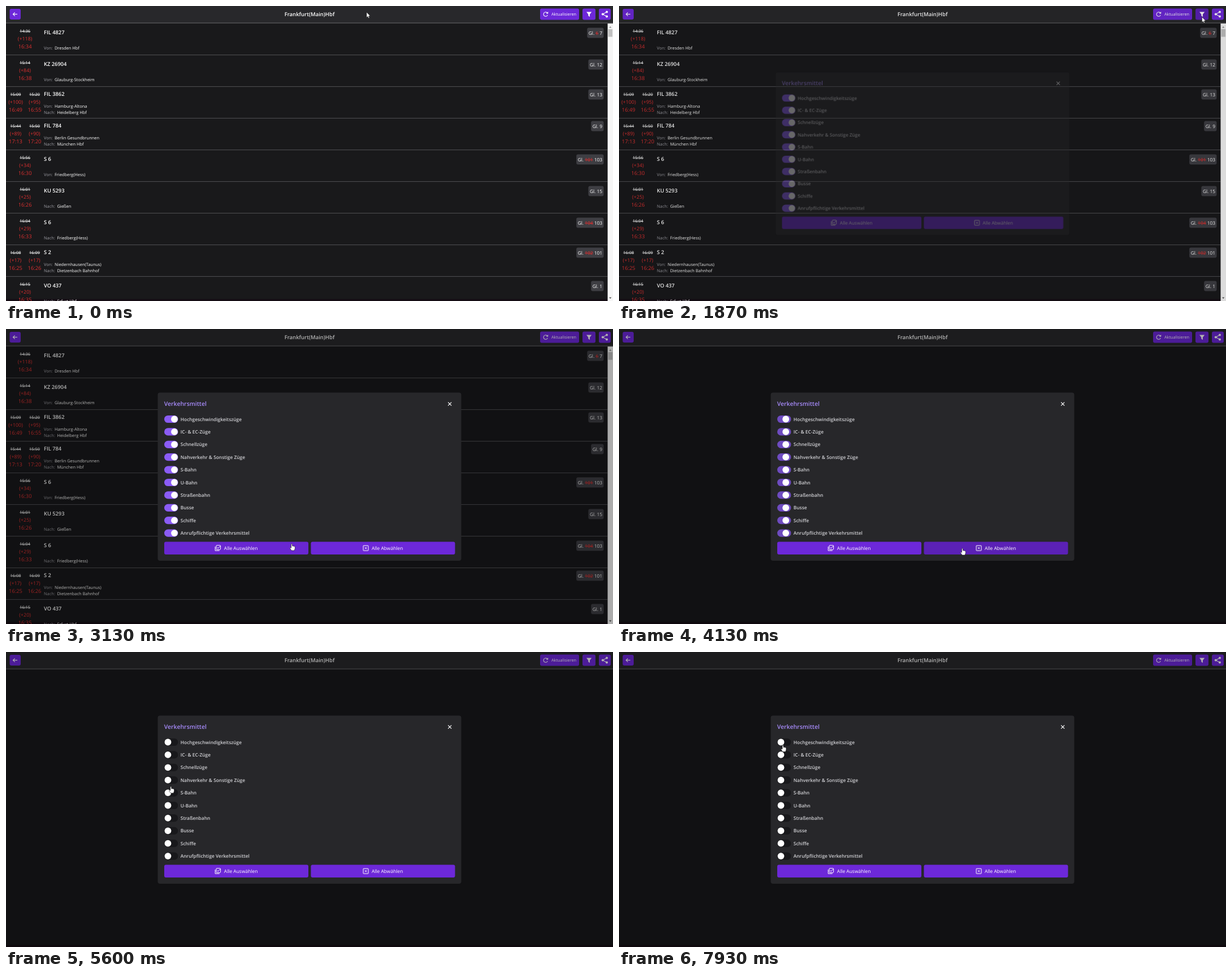
Write an HTML page with a canvas that moves like this. It is 1074 px wide and 522 px high and loops after 8 s.

```html
<!DOCTYPE html>
<html lang="de">
<head>
<meta charset="utf-8">
<title>Abfahrtstafel</title>
<style>
html, body { margin: 0; width: 100%; height: 100%; overflow: hidden; background: #19191b; }
canvas { display: block; width: 1074px; height: 522px; }
</style>
</head>
<body>
<canvas id="stage" width="1074" height="522"></canvas>
<script>
const W = 1074, H = 522, LOOP = 8000;
const stage = document.getElementById('stage').getContext('2d');
const layerCanvas = document.createElement('canvas');
layerCanvas.width = W;
layerCanvas.height = H;
const layer = layerCanvas.getContext('2d');
let c = stage;

const VIOLET = [109, 40, 217], VIOLET_DARK = [91, 33, 182];
const TRACK_ON = [139, 92, 246], TRACK_OFF = [24, 24, 27];
const RED = '#dc3030', GREEN = '#16a34a', WHITE = '#fff';

// times: planned|delay|actual, separated by commas for arrival and departure
const trains = [
  { name: 'FIL 4827', from: 'Dresden Hbf', old: '6', track: '7', times: '14:36|+118|16:34' },
  { name: 'KZ 26904', from: 'Glauburg-Stockheim', track: '12', times: '15:14|+84|16:38' },
  { name: 'FIL 3862', from: 'Hamburg-Altona', to: 'Heidelberg Hbf', track: '13', times: '15:09|+100|16:49,15:20|+95|16:55' },
  { name: 'FIL 784', from: 'Berlin Gesundbrunnen', to: 'München Hbf', track: '9', times: '15:44|+89|17:13,15:50|+90|17:20' },
  { name: 'S 6', from: 'Friedberg(Hess)', old: '101', track: '103', times: '15:56|+34|16:30' },
  { name: 'KU 5293', to: 'Gießen', track: '15', times: '16:01|+25|16:26' },
  { name: 'S 6', to: 'Friedberg(Hess)', old: '104', track: '103', times: '16:04|+29|16:33' },
  { name: 'S 2', from: 'Niedernhausen(Taunus)', to: 'Dietzenbach Bahnhof', old: '102', track: '101', times: '16:08|+17|16:25,16:09|+17|16:26' },
  { name: 'VO 437', to: 'Erfurt Hbf', track: '1', times: '16:15|+20|16:35' }
];
const filtered = [
  trains[8],
  { name: 'LO 6758', from: 'Norddeich Mole', track: '15', times: '16:35|+74|17:49' },
  { name: 'LO 5093', from: 'Heidelberg Hbf', to: 'Hamburg-Altona', track: '12', times: '16:40||16:40,16:48|+30|17:18' }
];
const modes = ['Hochgeschwindigkeitszüge', 'IC- & EC-Züge', 'Schnellzüge', 'Nahverkehr & Sonstige Züge',
  'S-Bahn', 'U-Bahn', 'Straßenbahn', 'Busse', 'Schiffe', 'Anrufpflichtige Verkehrsmittel'];

// pointer path: time, x, y
const path = [
  [133, 638, 11], [400, 730, 14], [1000, 972, 13], [1400, 1028, 15], [1800, 1031, 18], [1867, 1031.5, 19.5],
  [2000, 1015, 30], [2400, 800, 105], [2800, 600, 174], [3133, 505.5, 380], [3533, 607.5, 388],
  [4600, 607.5, 388], [4933, 480.5, 390], [5100, 410, 362], [5400, 298, 291],
  [5800, 285.5, 184.5], [7680, 285.5, 184.5], [7933, 290, 164.5]
];
const selectBtn = [280, 376.5, 255, 22.5], rejectBtn = [539.5, 376.5, 255, 22.5];
const refreshBtn = [945, 4.5, 69, 20], filterBtn = [1020, 4.5, 23, 20];
const toggles = [280, 153, 24, 215];

const clamp = v => Math.max(0, Math.min(1, v));
const smooth = (t, start, len) => { const p = clamp((t - start) / len); return p * p * (3 - 2 * p); };
const mix = (a, b, p) => `rgb(${a.map((v, i) => Math.round(v + (b[i] - v) * p)).join()})`;
const inside = ([x, y], [bx, by, bw, bh]) => x >= bx && x <= bx + bw && y >= by && y <= by + bh;

function pointer(t) {
  const i = path.findIndex(k => k[0] > t);
  if (i === 0) return path[0].slice(1);
  if (i < 0) return path[path.length - 1].slice(1);
  const [t0, x0, y0] = path[i - 1], [t1, x1, y1] = path[i];
  const p = (t - t0) / (t1 - t0);
  return [x0 + (x1 - x0) * p, y0 + (y1 - y0) * p];
}

// share of the last 150 ms spent over a box
function hover(t, box) {
  let n = 0;
  for (let k = 0; k < 5; k++) n += inside(pointer(t - k * 30), box);
  return n / 5;
}

function setFont(size, weight = 400) {
  c.font = `${weight} ${size}px "Open Sans", "Noto Sans", sans-serif`;
  c.textRendering = 'geometricPrecision';
}

// y is the middle of the capital letters; returns the right end
function text(s, x, y, size, color, { weight, align = 'left', strike } = {}) {
  setFont(size, weight);
  const w = c.measureText(s).width;
  if (align === 'center') x -= w / 2;
  c.fillStyle = color;
  c.fillText(s, x, y + size * 0.357);
  if (strike) c.fillRect(x, y - 0.1, w, 0.9);
  return x + w;
}

function box(x, y, w, h, r, color) {
  c.fillStyle = color;
  c.beginPath();
  c.roundRect(x, y, w, h, r);
  c.fill();
}

function dot(x, y, r, color = WHITE) {
  c.fillStyle = color;
  c.beginPath();
  c.arc(x, y, r, 0, 7);
  c.fill();
}

function poly(points, { fill, stroke, width = 1, close = true } = {}) {
  c.beginPath();
  points.forEach(([x, y]) => c.lineTo(x, y));
  if (close) c.closePath();
  if (fill) { c.fillStyle = fill; c.fill(); }
  if (stroke) { c.strokeStyle = stroke; c.lineWidth = width; c.stroke(); }
}
const line = (points, width = 1) => poly(points, { stroke: WHITE, width, close: false });

function header(t) {
  c.fillStyle = '#28282b';
  c.fillRect(0, 0, W, 29);
  c.fillStyle = '#464649';
  c.fillRect(0, 29, W, 2);
  const violet = mix(VIOLET, VIOLET, 0);
  box(6.5, 5, 19.5, 19, 3, violet);
  line([[20, 14.5], [12.5, 14.5]], 1.2);
  line([[15.7, 11.3], [12.5, 14.5], [15.7, 17.7]], 1.2);
  text('Frankfurt(Main)Hbf', 537, 14.5, 9.5, WHITE, { weight: 600, align: 'center' });

  box(...refreshBtn, 3, violet);
  c.strokeStyle = WHITE;
  c.lineWidth = 1.1;
  c.beginPath();
  c.arc(954.8, 14.6, 3.7, 0.35, 5.5);
  c.stroke();
  poly([[959.2, 10], [959.2, 13.6], [955.6, 13.6]], { fill: WHITE });
  text('Aktualisieren', 965, 14.7, 7.3, WHITE);

  const over = t < 1900 ? hover(t, filterBtn) : 0;
  box(...filterBtn, 3, mix(VIOLET, VIOLET_DARK, over));
  poly([[1027, 10.5], [1036.2, 10.5], [1032.9, 14.8], [1032.9, 19.2], [1030.3, 17.3], [1030.3, 14.8]], { fill: WHITE });

  box(1049, 4.5, 21, 20, 3, violet);
  line([[1063, 10.6], [1055.8, 14.6], [1063, 18.6]], 1.1);
  dot(1055.8, 14.6, 2);
  dot(1063, 10.6, 2);
  dot(1063, 18.6, 2);
}

function clock(entry, x, top) {
  const [plan, delay, real] = entry.split('|');
  const opt = { align: 'center' };
  if (!delay) {
    text(plan, x, top + 20.5, 8.4, WHITE, opt);
    text(real, x, top + 35.3, 9.4, GREEN, opt);
    return;
  }
  text(plan, x, top + 13.6, 7.35, WHITE, { align: 'center', strike: true });
  text(`(${delay})`, x, top + 26.5, 8.9, RED, opt);
  text(real, x, top + 41, 9.4, RED, opt);
}

function badge(train, right, y) {
  setFont(8.35);
  const parts = [['Gl. ', WHITE], ...(train.old ? [[train.old, RED, true], [' ', WHITE]] : []), [train.track, WHITE]];
  const w = parts.reduce((sum, p) => sum + c.measureText(p[0]).width, 0);
  box(right - w - 5, y - 9, w + 5, 18, 3, '#3e3e43');
  let x = right - w - 2.5;
  for (const [s, color, strike] of parts) x = text(s, x, y + 0.3, 8.35, color, { strike });
}

function row(train, i, right) {
  const top = 31 + 56 * i, times = train.times.split(',');
  const stops = [['Von:', train.from], ['Nach:', train.to]].filter(s => s[1]);
  const both = stops.length === 2;
  if (times.length > 1) times.forEach((e, k) => clock(e, 17 + 33.5 * k, top));
  else clock(times[0], 33.6, top);
  text(train.name, 67, top + (both ? 12.7 : 15.7), 9.3, WHITE, { weight: 600 });
  stops.forEach(([label, place], k) => {
    const y = top + (both ? 34.5 + 11.2 * k : 43);
    const x = text(label, 67, y, 7.4, '#9b9ba2');
    text(place, x + 3.7, y, 7.45, WHITE);
  });
  badge(train, right - 7, top + (both ? 13.6 : 16.6));
  c.fillStyle = '#57575b';
  c.fillRect(0, top + 55.2, right, 0.9);
}

function scrollbar() {
  c.fillStyle = '#f6f6f6';
  c.fillRect(1064.5, 31, 9.5, H - 31);
  c.fillStyle = '#c1c1c1';
  c.fillRect(1065.5, 41, 7.5, 13.5);
  poly([[1067, 38.4], [1069.2, 36], [1071.4, 38.4]], { fill: '#8a8a8a' });
  poly([[1067, 515.6], [1069.2, 518], [1071.4, 515.6]], { fill: '#505050' });
}

function page(t) {
  c.fillStyle = '#19191b';
  c.fillRect(0, 0, W, H);
  c.fillStyle = '#150d14';
  c.fillRect(0, 518.5, W, 4);
  if (t < 4130) {
    trains.forEach((train, i) => row(train, i, 1064.5));
    scrollbar();
  } else if (t >= 6060 && t < 7595) {
    filtered.forEach((train, i) => row(train, i, W));
  }
  header(t);
}

function toggle(y, on) {
  box(280, y - 6.6, 24.4, 13.2, 6.6, mix(TRACK_OFF, TRACK_ON, on));
  dot(286.5 + 11.5 * on, y, 5.9);
}

function action(t, bounds, label, iconX, textX) {
  box(...bounds, 3, mix(VIOLET, VIOLET_DARK, hover(t, bounds)));
  text(label, textX, 388, 8.45, WHITE);
  c.strokeStyle = WHITE;
  c.lineWidth = 1;
  c.beginPath();
  if (bounds === selectBtn) {
    c.roundRect(iconX - 2.7, 382.8, 7.6, 7.6, 1);
    c.stroke();
    line([[iconX - 4.6, 385], [iconX - 4.6, 392.2], [iconX + 3, 392.2]], 1);
    line([[iconX - 1, 386.5], [iconX + 0.5, 388.2], [iconX + 4.6, 383.8]], 1);
  } else {
    c.roundRect(iconX - 4.5, 383.2, 9, 9, 0.8);
    c.stroke();
    line([[iconX - 1.9, 385.8], [iconX + 1.9, 389.6]]);
    line([[iconX + 1.9, 385.8], [iconX - 1.9, 389.6]]);
  }
}

function dialog(t) {
  c.clearRect(0, 0, W, H);
  box(268.5, 112.5, 537, 297.5, 4, '#27272a');
  text('Verkehrsmittel', 279.7, 132, 10.5, '#a78bfa', { weight: 600 });
  line([[782.2, 129.6], [788.2, 135.6]], 1.2);
  line([[788.2, 129.6], [782.2, 135.6]], 1.2);
  const all = 1 - smooth(t, 4065, 210);
  const single = smooth(t, 6020, 210) - smooth(t, 7545, 210);
  modes.forEach((mode, i) => {
    const y = 159.5 + 22.4 * i;
    toggle(y, i === 1 ? all + single : all);
    text(mode, 308.8, y + 0.2, 8.35, '#d2d2d6', { weight: 600 });
  });
  action(t, selectBtn, 'Alle Auswählen', 374.7, 385.8);
  action(t, rejectBtn, 'Alle Abwählen', 636.6, 647);
}

function cursor(t) {
  const pos = pointer(t);
  const zones = t < 1800 ? [refreshBtn, filterBtn] : [selectBtn, rejectBtn, toggles];
  c.save();
  c.translate(...pos);
  c.lineJoin = 'round';
  if (zones.some(z => inside(pos, z))) {
    const hand = new Path2D('M-1 .9Q0-.5 1 .9V4Q5.8 3.9 5.8 6V8.4L4.6 12H-.4L-3.3 7.7Q-3.1 6-1 7.4Z');
    c.fillStyle = WHITE;
    c.fill(hand);
    c.strokeStyle = '#111';
    c.lineWidth = 0.6;
    c.stroke(hand);
  } else {
    poly([[0, 0], [0, 9.3], [2.1, 7.4], [3.5, 10.6], [5, 10], [3.7, 6.8], [6.5, 6.8]],
      { fill: WHITE, stroke: '#111', width: 0.5 });
  }
  c.restore();
}

function draw(t) {
  c = stage;
  page(t);
  const p = clamp((t - 1800) / 300), open = 1 - (1 - p) ** 1.7;
  if (open > 0) {
    c.fillStyle = `rgba(0,0,0,${0.3 * open})`;
    c.fillRect(0, 0, W, H);
    c = layer;
    dialog(t);
    c = stage;
    const s = 0.95 + 0.05 * open;
    c.save();
    c.globalAlpha = open;
    c.translate(537, 261.25);
    c.scale(s, s);
    c.drawImage(layerCanvas, -537, -261.25);
    c.restore();
  }
  cursor(t);
}

const begin = performance.now();
function tick() {
  const t = (performance.now() - begin) % LOOP;
  // the picture advances at 15 steps a second
  draw(Math.floor((t + 4) * 0.015) / 0.015);
  requestAnimationFrame(tick);
}
tick();
</script>
</body>
</html>
```
